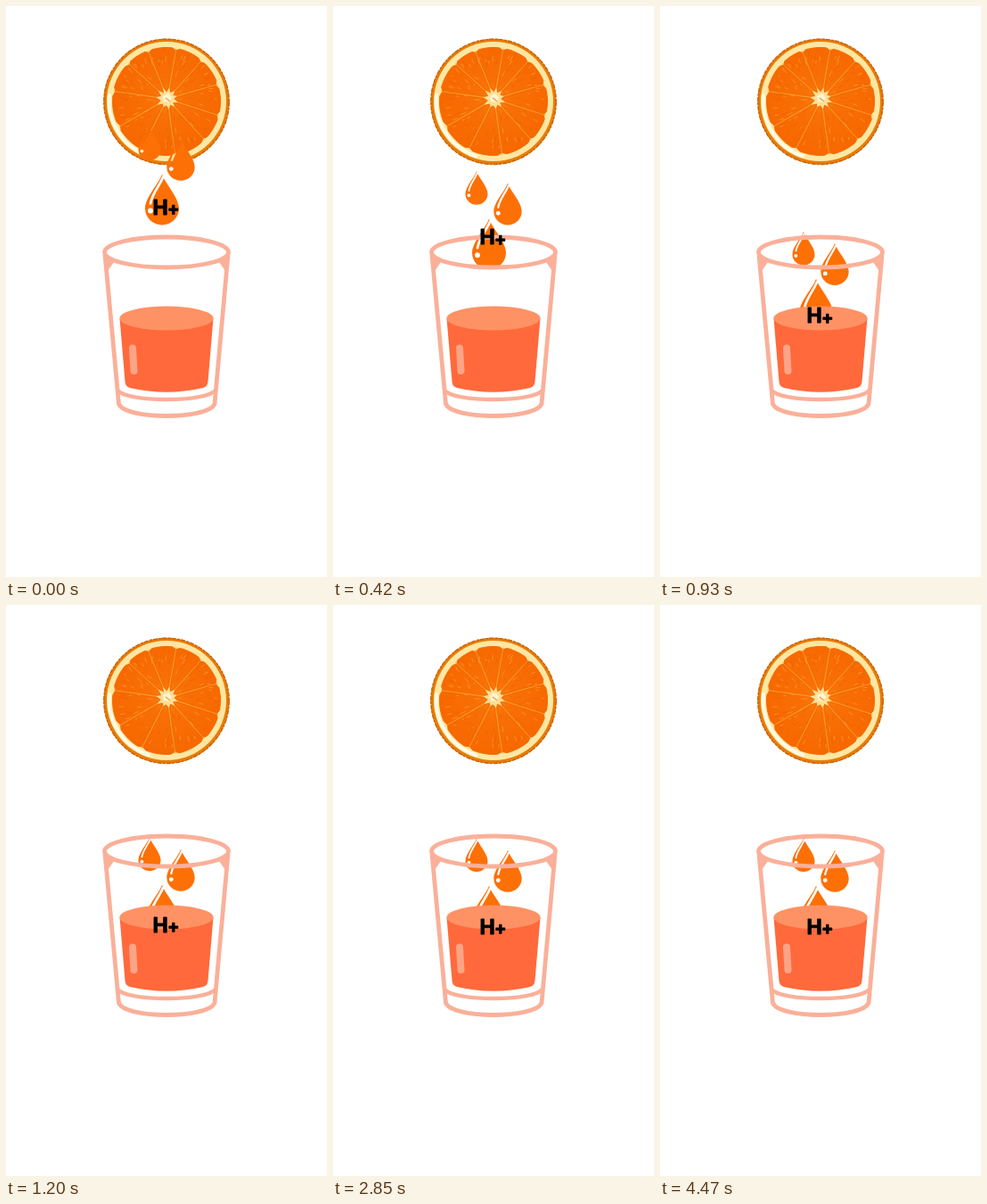
Recreate the animation shown at these times as an HTML page. Size 360 px wide and 640 px high, loop 4500 ms.

```html
<!DOCTYPE html>
<html lang="en">
<head>
<meta charset="utf-8">
<title>Orange juice</title>
<style>
html, body { margin: 0; width: 100%; height: 100%; overflow: hidden; background: #fff; }
svg { display: block; width: 100vw; height: 100vh; }
text { font-family: Inter, sans-serif; font-weight: 700; stroke: #000; stroke-width: .9; stroke-linejoin: round; }
</style>
</head>
<body>
<svg viewBox="0 0 360 640">
  <defs>
    <radialGradient id="flesh" gradientUnits="userSpaceOnUse" cx="181" cy="104" r="62">
      <stop offset="0" stop-color="#fb8a1c"/>
      <stop offset=".3" stop-color="#f87006"/>
      <stop offset="1" stop-color="#f76800"/>
    </radialGradient>
    <mask id="shine" maskUnits="userSpaceOnUse" x="-22" y="-3" width="44" height="64">
      <rect x="-22" y="-3" width="44" height="64" fill="#fff"/>
      <path d="M1 3.500C-2.500 13-11 21-13 33" fill="none" stroke="#000" stroke-width="2.700" stroke-linecap="round"/>
      <circle cx="-13" cy="41" r="2.900"/>
    </mask>
    <path id="drop" mask="url(#shine)" fill="#fd7006" d="M0 0C3 10 19 26 19 38.500A19 18.500 0 0 1-19 38.500C-19 26-3 10 0 0Z"/>
  </defs>

  <g id="slice">
    <circle cx="180" cy="107.300" r="70.500" fill="#e87c08"/>
    <circle cx="180" cy="107.300" r="70.200" fill="none" stroke="#c96208" stroke-width="1.400" stroke-dasharray="5 1.500 3 1"/>
    <circle cx="180" cy="107" r="67" fill="#ffe7a3"/>
    <path d="M116 100A65 65 0 0 0 160 168" fill="none" stroke="#fffae4" stroke-width="4" stroke-linecap="round"/>
  </g>

  <g id="drops"></g>

  <g fill="none" stroke="#fab099" stroke-width="4.800" stroke-linejoin="round">
    <ellipse cx="180" cy="276" rx="69.500" ry="17"/>
    <path d="M111 279L126.500 446C134 464 226 464 234 446L249 279"/>
    <path d="M125 430.500C134 444.500 226 444.500 235 430.500" stroke-width="4.400"/>
  </g>
  <path d="M112 281L114 297L121 287ZM248 281L246 297L239 287Z" fill="#fab099"/>

  <path d="M127.500 350L133.500 421Q134 426.500 139 428Q180 437.500 221 428Q226 426.500 226.500 421L232.500 350Z" fill="#ff693b"/>
  <ellipse cx="180" cy="350" rx="52.500" ry="13.500" fill="#ff9264"/>
  <path d="M142 383.500L143.500 409" stroke="#fea486" stroke-width="8" stroke-linecap="round"/>

  <g id="label">
    <text x="164.500" y="234" font-size="23">H</text>
    <text x="181" y="234.300" font-size="20">+</text>
  </g>
</svg>
<script>
const LOOP = 4500, STEP = 30, FALL = 1355, LAG = 75;
const DROP_TRAVEL = 126, LABEL_TRAVEL = 135;
const $ = id => document.getElementById(id);

function add(parent, tag, attrs) {
  const el = document.createElementNS('http://www.w3.org/2000/svg', tag);
  for (const k in attrs) el.setAttribute(k, attrs[k]);
  parent.append(el);
  return el;
}

let seed = 7;
const rand = () => (seed = seed * 16807 % 2147483647) / 2147483647;

function drawFruit() {
  const slice = $('slice'), cx = 181, cy = 104;
  const polar = (deg, r) => {
    const a = deg * Math.PI / 180;
    return [cx + r * Math.cos(a), cy + r * Math.sin(a)];
  };
  // distance from the core to the edge of the flesh
  const reach = deg => {
    const a = deg * Math.PI / 180, b = Math.cos(a) - 3 * Math.sin(a);
    return -b + Math.sqrt(b * b + 60.5 * 60.5 - 10);
  };
  const point = p => p.map(v => v.toFixed(1)).join(' ');
  const walls = [-172, -138, -112, -80, -48, -16, 18, 48, 82, 117, 150];

  add(slice, 'circle', { cx: 180, cy: 107, r: 58.5, fill: '#f7770a' });
  walls.forEach((from, i) => {
    const to = i + 1 < walls.length ? walls[i + 1] : walls[0] + 360;
    const pts = [polar((from + to) / 2, 7)];
    for (let k = 0; k <= 8; k++) {
      const deg = from + .5 + (to - from - 1) * k / 8;
      pts.push(polar(deg, reach(deg) - (k % 8 ? 0 : 2)));
    }
    add(slice, 'path', { d: 'M' + pts.map(point).join('L') + 'Z', fill: 'url(#flesh)', stroke: '#f46c02', 'stroke-linejoin': 'round' });
  });

  let dark = '', light = '';
  for (let i = 0; i < 190; i++) {
    const deg = rand() * 360, r = 14 + 40 * Math.sqrt(rand()), len = 2 + rand() * 5;
    const d = 'M' + point(polar(deg, r)) + 'L' + point(polar(deg + 1, Math.min(r + len, 56)));
    if (i % 3) dark += d; else light += d;
  }
  add(slice, 'path', { d: dark, stroke: '#e95c00', 'stroke-width': 1, opacity: .5 });
  add(slice, 'path', { d: light, stroke: '#ffb650', 'stroke-width': .8, opacity: .6 });

  const lines = walls.map(deg => 'M' + point(polar(deg, 6)) + 'L' + point(polar(deg, reach(deg)))).join('');
  add(slice, 'path', { d: lines, stroke: '#fca63a', 'stroke-width': 1, opacity: .75 });

  const star = [];
  walls.forEach(deg => star.push(polar(deg, 10 + rand() * 4), polar(deg + 16, 7.5)));
  add(slice, 'path', { d: 'M' + star.map(point).join('L') + 'Z', fill: '#ffdf95' });
  add(slice, 'path', { d: 'M176 101L182 98L186 103L183 108L177 107Z', fill: '#fff4d2' });
  add(slice, 'path', { d: 'M179 103L184 107', stroke: '#e9a03c', 'stroke-width': 1.2 });
}

const drops = [[161, 135.5, .66], [196, 148.7, .825], [175, 188.5, 1]]
  .map(([x, y, size]) => ({ x, y, size, el: add($('drops'), 'use', { href: '#drop' }) }));

// cubic-bezier(.4, 0, .2, 1)
function ease(u) {
  if (u <= 0) return 0;
  if (u >= 1) return 1;
  let lo = 0, hi = 1;
  for (let i = 0; i < 24; i++) {
    const s = (lo + hi) / 2, q = 1 - s;
    if (1.2 * s * q * q + .6 * s * s * q + s * s * s < u) lo = s; else hi = s;
  }
  return lo * lo * (3 - 2 * lo);
}

function render(t) {
  const fall = DROP_TRAVEL * ease(t / FALL);
  for (const d of drops) d.el.setAttribute('transform', `translate(${d.x} ${d.y + fall}) scale(${d.size})`);
  $('label').setAttribute('transform', `translate(0 ${LABEL_TRAVEL * ease((t - LAG) / FALL)})`);
}

drawFruit();
render(0);
const start = performance.now();
function tick() {
  const t = (performance.now() - start) % LOOP;
  render(Math.floor(t / STEP) * STEP);
  requestAnimationFrame(tick);
}
requestAnimationFrame(tick);
</script>
</body>
</html>
```
